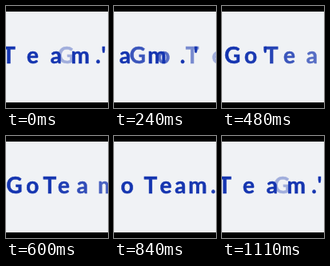
Animation, 128 px wide and 128 px high, one loop 1.14 s. Source, as an HTML page:

```html
<!DOCTYPE html>
<html lang="en">
<head>
<meta charset="utf-8">
<title>Go Team</title>
<style>
  html, body { margin: 0; width: 100%; height: 100%; overflow: hidden; background: #000; }
  svg { display: block; width: 100%; height: 100%; }
  text {
    font: 700 28px Lato, "Open Sans", sans-serif;
    fill: #1535b0; stroke: #1535b0; stroke-width: 0.5; text-anchor: middle;
  }
</style>
</head>
<body>
<svg viewBox="0 0 128 128">
  <rect y="7" width="128" height="114" fill="#f0f2f5"/>
</svg>
<script>
const LOOP = 1140, STEP = 30;
const CYCLE = 1110, HALF = CYCLE / 2;   // one pass of a letter
const FIRST = 498, STAGGER = 81;        // when each letter is at rest
const PULL = 0.00025;                   // px per ms squared

const svg = document.querySelector('svg');
const rest = [13, 33.5, 54, 67.5, 83.5, 104, 119.5, 123];
const letters = [..."GoTeam.'"].map((char, i) => {
  const el = document.createElementNS(svg.namespaceURI, 'text');
  el.textContent = char;
  el.setAttribute('y', 72);
  svg.append(el);
  return { el, x: rest[i], at: FIRST + i * STAGGER };
});

// Letters slow down towards rest, then speed up to the left.
function draw(time) {
  for (const { el, x, at } of letters) {
    const u = ((time - at + HALF) % CYCLE + CYCLE) % CYCLE - HALF;
    el.setAttribute('x', x - PULL * u * Math.abs(u));
    el.setAttribute('opacity', u < 0 ? 1 - 0.8 * (u / HALF) ** 2 : 1);
  }
}

function tick() {
  draw(Math.floor(performance.now() % LOOP / STEP) * STEP);
  requestAnimationFrame(tick);
}
tick();
</script>
</body>
</html>
```
